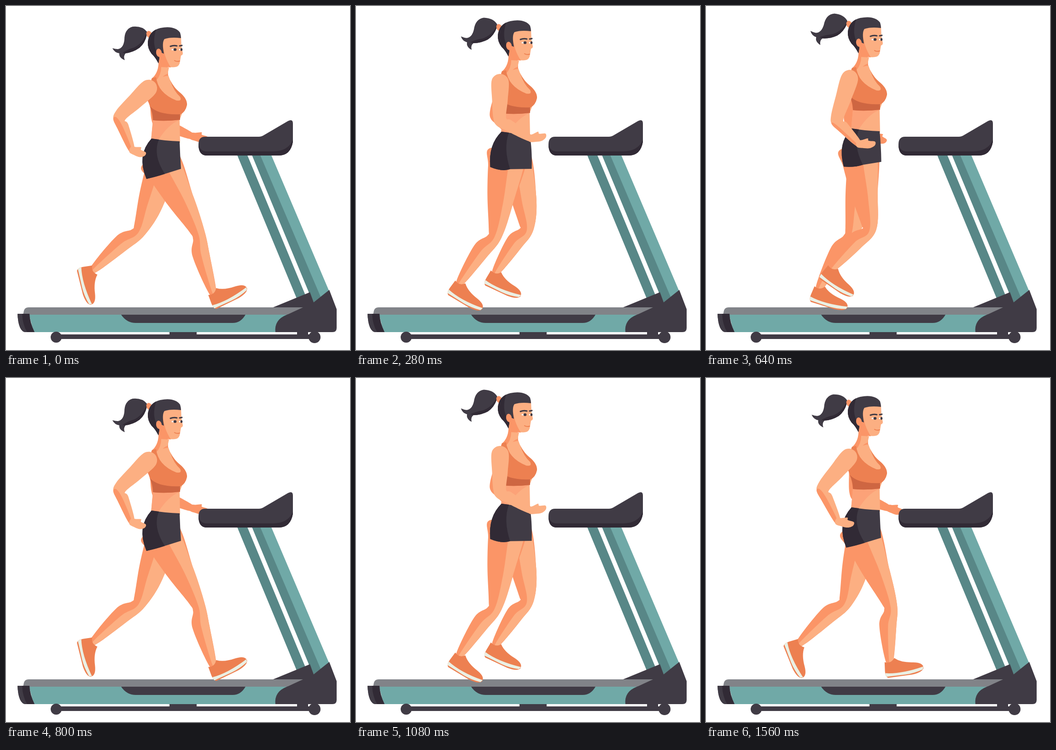
Write an HTML page with a canvas that moves like this. It is 747 by 750 pixels and loops after 1600 ms.

```html
<!DOCTYPE html>
<html lang="en">
<head>
<meta charset="utf-8">
<title>Treadmill walk</title>
<style>
html, body { margin: 0; width: 100%; height: 100%; overflow: hidden; background: #fff }
canvas { display: block }
</style>
</head>
<body>
<canvas id="stage" width="747" height="750"></canvas>
<script>
const ctx = document.getElementById('stage').getContext('2d');
const LIGHT = '#fcaf82', SKIN = '#fb9567', ORANGE = '#ed8051', RUST = '#ce6642',
  BLACK = '#403b45', INK = '#312a35', TEAL = '#70a9a7', DEEP = '#588787', CREAM = '#eaf0e4';
const STRIDE = 800, STEP = 40;

// Pose rows: time, then values
const LEG = [ // knee, ankle, shoe angle
  [0, 418, 498, 450, 627, -26], [80, 385, 492, 371, 628, 1], [180, 342, 496, 286, 627, 3],
  [280, 301, 503, 224, 606, 31], [360, 301, 492, 202, 580, 68], [400, 288, 493, 188, 577, 76],
  [440, 284, 498, 182, 571, 64], [480, 288, 503, 200, 571, 47], [580, 330, 496, 242, 566, 44],
  [680, 371, 488, 302, 583, 25], [760, 401, 500, 399, 620, -8]];
const NEAR_ARM = [ // elbow, wrist, fingertips
  [0, 246, 241, 274, 314, 302, 324], [280, 312, 248, 380, 289, 412, 283],
  [400, 327, 258, 402, 286, 436, 278], [480, 322, 259, 391, 286, 425, 278],
  [760, 253, 240, 287, 313, 320, 319]];
const FAR_ARM = [
  [0, 330, 252, 405, 284, 437, 290], [280, 303, 236, 345, 285, 370, 296],
  [400, 287, 237, 312, 283, 335, 300], [480, 295, 238, 322, 283, 345, 300],
  [760, 325, 254, 398, 284, 426, 292]];
const BOB = [[0, 0], [80, -10], [200, -26], [280, -15], [360, -7]];

// Smooth periodic interpolation through the rows
function sample(rows, time, period = STRIDE) {
  const t = (time % period + period) % period, n = rows.length;
  const row = i => rows[(i + n) % n], when = i => row(i)[0] + Math.floor(i / n) * period;
  let i = n - 1;
  while (rows[i][0] > t) i--;
  const span = when(i + 1) - when(i), u = (t - when(i)) / span;
  return row(i).slice(1).map((a, k) => {
    const v = j => row(j)[k + 1];
    const slope = j => (v(j + 1) - v(j - 1)) / (when(j + 1) - when(j - 1)) * span;
    const b = v(i + 1), m = slope(i), q = slope(i + 1);
    return a + u * (m + u * (3 * (b - a) - 2 * m - q + u * (2 * (a - b) + m + q)));
  });
}

function shape(color, d) {
  ctx.fillStyle = color;
  ctx.fill(new Path2D(d));
}

function line(color, width, d) {
  ctx.strokeStyle = color;
  ctx.lineWidth = width;
  ctx.lineCap = 'round';
  ctx.stroke(new Path2D(d));
}

function oval(color, x, y, rx, ry = rx, turn = 0) {
  ctx.fillStyle = color;
  ctx.beginPath();
  ctx.ellipse(x, y, rx, ry, turn, 0, 7);
  ctx.fill();
}

// Closed curve through the points
function blob(color, points) {
  const n = points.length, p = i => points[(i + n) % n];
  ctx.fillStyle = color;
  ctx.beginPath();
  ctx.moveTo(...p(0));
  for (let i = 0; i < n; i++) {
    const [a, b, c, d] = [p(i - 1), p(i), p(i + 1), p(i + 2)];
    ctx.bezierCurveTo(b[0] + (c[0] - a[0]) / 6, b[1] + (c[1] - a[1]) / 6,
      c[0] - (d[0] - b[0]) / 6, c[1] - (d[1] - b[1]) / 6, ...c);
  }
  ctx.fill();
}

// Point along a bone, pushed sideways; positive is the front
const bone = (a, b) => (t, side) => {
  const dx = b[0] - a[0], dy = b[1] - a[1], len = Math.hypot(dx, dy);
  return [a[0] + dx * t + dy / len * side, a[1] + dy * t - dx / len * side];
};

function leg(time, hip, front, seam) {
  const [kx, ky, ax, ay, angle] = sample(LEG, time);
  const thigh = bone(hip, [kx, ky]), shin = bone([kx, ky], [ax, ay]);
  const fore = [thigh(0, front), thigh(.6, 29), thigh(1, 15), shin(.35, 13), shin(1, 7)];
  blob(SKIN, [...fore, shin(1, -8), shin(.33, -24), shin(.06, -14),
    thigh(.92, -15), thigh(.55, -28), thigh(.2, -36), thigh(0, -37)]);
  blob(LIGHT, [...fore, shin(1, -1), shin(.35, -5), thigh(1, 0), thigh(.6, seam * .7), thigh(0, seam)]);
  ctx.save();
  ctx.translate(ax, ay);
  ctx.rotate(angle * Math.PI / 180);
  shape(ORANGE, 'M-11-2Q2 4 11-8Q24 4 50 7Q72 10 71 22Q68 31 45 33H-8Q-14 30-13 18Z');
  shape(CREAM, 'M-13 22Q20 29 71 19L69 25Q50 31 30 31L-12 30Z');
  ctx.restore();
}

function arm(rows, time, shoulder, color, shade) {
  const [ex, ey, wx, wy, hx, hy] = sample(rows, time);
  const upper = bone(shoulder, [ex, ey]), lower = bone([ex, ey], [wx, wy]), hand = bone([wx, wy], [hx, hy]);
  blob(color, [upper(-.15, 0), upper(0, 18), upper(.5, 17), upper(.95, 14), lower(.3, 12), lower(1, 6),
    lower(1, -7), lower(.3, -13), lower(0, -14), upper(.95, -14), upper(.5, -17), upper(0, -18)]);
  if (shade > 0) blob(SKIN, [lower(0, -14), lower(.3, -13), lower(1, -7),
    lower(1, -7 + 7 * shade), lower(.3, -13 + 12 * shade), lower(0, -14 + 8 * shade)]);
  blob(color, [hand(-.15, 6), hand(.2, 9), hand(.55, 12), hand(.6, 7), hand(1, 5),
    hand(1, -3), hand(.7, -9), hand(.3, -9), hand(-.15, -6)]);
}

function treadmill() {
  shape(DEEP, 'M502 325H524L650 630L631 637ZM534 325H553L685 633L667 647Z');
  shape(TEAL, 'M552 325H576L701 620L684 636Z');
  shape(BLACK, 'M418 302Q418 285 432 285H549Q555 285 561 281L612 251Q623 245 623 256V296Q618 326 592 326H436Q418 326 418 302');
  shape(INK, 'M418 301Q421 317 436 317H580Q612 317 623 292V296Q618 326 592 326H436Q418 326 418 301');
  shape(TEAL, 'M50 672H625V711H60Z');
  shape('#818388', 'M37 673L39 664Q41 657 49 657H648L610 673Z');
  shape(INK, 'M25 671H51Q52 690 62 711H43Q27 711 25 671');
  shape(BLACK, 'M25 671H35Q36 695 46 711H43Q27 711 25 671');
  shape(BLACK, 'M250 673H520Q510 691 492 691H282Q262 691 250 673');
  shape(BLACK, 'M580 657L660 624L668 646L702 619L718 661V702Q718 711 709 711H585Q582 684 610 673Q630 664 645 657Z');
  shape(BLACK, 'M108 716H670V726H108ZM355 711H414V717H355ZM632 711H656V717H632Z');
  oval(BLACK, 109, 722, 12);
  oval(BLACK, 670, 722, 13);
}

function head(bob) {
  ctx.save();
  ctx.translate(311, 62);
  ctx.rotate(-bob * Math.PI / 360);
  ctx.translate(-311, -62);
  shape(BLACK, 'M306 56Q296 43 275 45Q257 50 257 74Q255 92 243 94Q238 94 231 92Q236 102 246 103Q245 113 258 118Q254 109 260 103Q276 101 290 91Q302 81 306 62Z');
  shape(INK, 'M305 59Q297 82 277 91Q265 94 253 102L260 103Q276 101 290 91Q302 81 306 62Z');
  ctx.restore();
  oval(SKIN, 311, 62, 6, 8, -.4);
  shape(LIGHT, 'M336 72L380 66L381 88L384 103Q384 107 380 108L378 120Q377 132 368 133Q354 135 344 130L332 110Z');
  shape(SKIN, 'M340 80Q343 112 358 134Q342 134 331 122L330 100Z');
  shape(BLACK, 'M380 70Q358 67 344 72Q338 80 343 104L338 102Q336 92 329 96L333 113L331 125Q324 111 316 104Q307 92 308 78Q311 54 335 48Q366 42 378 58Q380 64 380 70');
  shape(INK, 'M331 125Q324 111 316 104Q307 92 308 78Q311 58 326 51Q316 82 329 104L333 113Z');
  oval(SKIN, 332, 102, 6, 9, -.15);
  line(BLACK, 3, 'M357 88Q364 85 371 87M377 87L382 86');
  line('#fff', 3, 'M361 95H364M377 95H378');
  oval(BLACK, 367, 95, 3.3, 3);
  oval(BLACK, 381, 95, 2.3, 3);
  line(ORANGE, 2, 'M366 119Q371 122 377 120');
}

function torso() {
  shape(LIGHT, 'M330 145L316 159L305 200Q318 222 319 250L315 294L378 298L377 248L390 215L375 187Q358 170 352 150Z');
  shape('#fca278', 'M319 248H378Q352 258 331 292H315Z');
  shape(SKIN, 'M331 118Q333 144 316 159L328 160Q340 153 352 152V134Z');
  shape(LIGHT, 'M337 133L354 134L351 148Q340 150 331 170L326 163Q337 150 337 133');
  shape(ORANGE, 'M317 157L326 155Q330 190 370 206Q383 208 378 198Q364 185 357 163Q366 180 377 188Q394 202 393 216Q390 231 378 237V248Q345 252 319 249Q317 225 305 200Z');
  shape(RUST, 'M312 218Q330 238 378 236V248Q345 252 319 249Q319 232 312 218');
}

// s is 0 with the near leg in front, 1 with it behind
function shorts(s) {
  const mix = (a, b) => a + (b - a) * s;
  const lx = mix(305, 288), ly = mix(377, 363), rx = mix(380, 382), ry = mix(355, 374);
  const mx = mix(345, 332), my = mix(366, 372);
  const left = `M316 289Q${mix(283, 288)} ${mix(325, 315)} ${lx} ${ly}Q${mx - 18} ${my + 6} ${mx} ${my}`;
  shape(BLACK, `${left}L${rx} ${ry}Q${mix(378, 384)} 325 377 295Q345 294 316 289`);
  shape(INK, `${left}Q${mix(318, 320)} 325 332 291Z`);
}

function draw(time) {
  const [bob] = sample(BOB, time, STRIDE / 2);
  const back = (1 - Math.cos(time / STRIDE * 2 * Math.PI)) / 2;
  ctx.fillStyle = '#fff';
  ctx.fillRect(0, 0, 747, 750);
  arm(FAR_ARM, time, [330, 178 + bob], SKIN, 0);
  treadmill();
  leg(time + STRIDE / 2, [350, 330 + bob], 24, -5);
  leg(time, [328, 330 + bob], 42, 11);
  ctx.save();
  ctx.translate(0, bob);
  torso();
  shorts(back);
  head(bob);
  ctx.restore();
  arm(NEAR_ARM, time, [313, 176 + bob], LIGHT, 1 - back * 1.3);
}

const start = performance.now();
(function tick() {
  draw(Math.floor((performance.now() - start) / STEP) * STEP % STRIDE);
  requestAnimationFrame(tick);
})();
</script>
</body>
</html>
```
